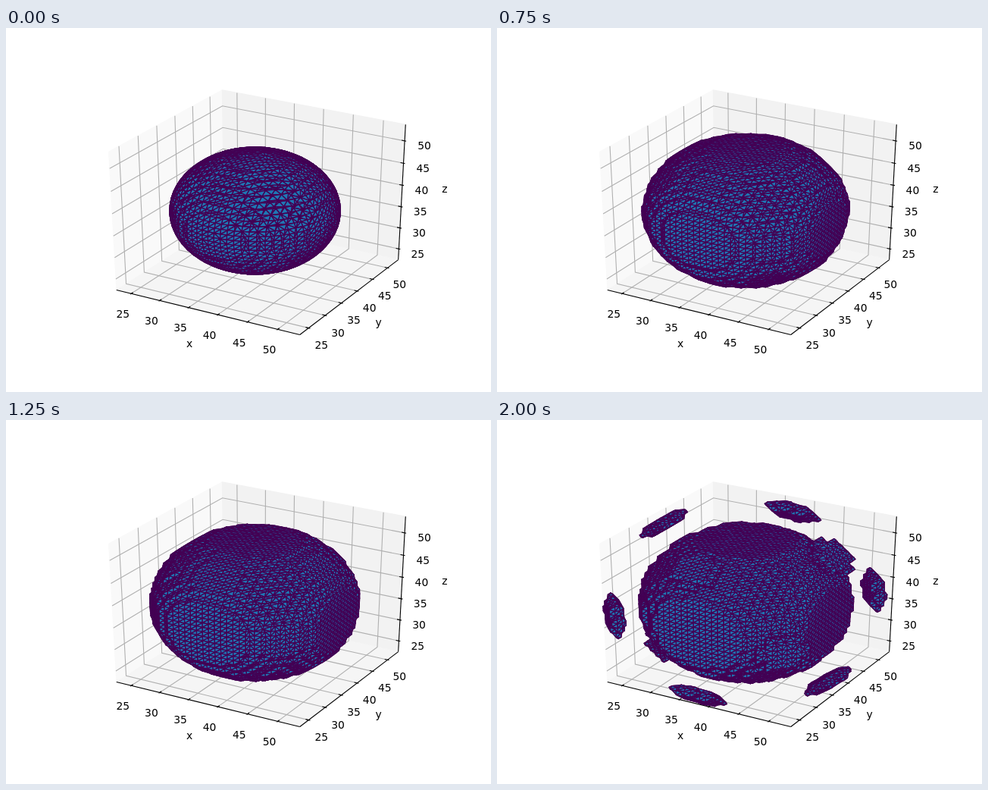
An HTML page with a canvas for the animation above (2.25 s loop, 640 by 480 pixels).

```html
<!DOCTYPE html>
<html lang="en">
<head>
<meta charset="utf-8">
<title>Growing isosurface</title>
<style>
  html, body { margin: 0; width: 100%; height: 100%; overflow: hidden; background: #fff; }
  svg, canvas { position: absolute; left: 0; top: 0; width: 640px; height: 480px; }
  text { font: 13.89px "DejaVu Sans", sans-serif; text-anchor: middle; fill: #000; }
</style>
</head>
<body>
<svg id="axes" viewBox="0 0 640 480"></svg>
<canvas id="mesh" width="640" height="480"></canvas>
<script>
const STEP = 250, LOOP = 2250;
const MID = 38, SPAN = 30;              // axis limits 23 to 53
const CENTER = 37.5;                    // middle of the volume
const LOW = 20, SIZE = 37;              // sampled voxels
const RADIUS = [12.6, 14.75, 15.1, 15.2, 15.3, 15.4, 15.5, 15.6, 15.65];
const SMOOTH = [1, 0.5, 0.12, 0.5, 0.6, 0.3, 0.12, 0.08, 0.08];

// Perspective view: elevation 30, azimuth -60, distance 10; unit-cube coordinates.
const C = Math.sqrt(3) / 2;
function project([x, y, z]) {
  const dist = 10 - (C * 0.5 * x - C * C * y + 0.5 * z);
  return [
    334.7 + 2681 * (C * x + 0.5 * y) / dist,
    237.4 - 1997.8 * (-0.25 * x + 0.5 * C * y + C * z) / dist,
    dist
  ];
}
const unit = v => (v - MID) / SPAN;

function drawAxes() {
  const H = 0.5 + 1 / 48, L = H + 0.0738;
  const IN = 1 / 60, OUT = 1 / 120;
  const out = [];
  const pts = list => list.map(p => project(p).slice(0, 2).map(n => n.toFixed(2)).join()).join(" ");
  const pane = (fill, ...p) => out.push(`<polygon points="${pts(p)}" fill="${fill}" stroke="${fill}"/>`);
  const line = (color, ...p) =>
    out.push(`<polyline points="${pts(p)}" fill="none" stroke="${color}" stroke-width="1.11"/>`);
  const text = (s, x, y) => out.push(`<text x="${x.toFixed(2)}" y="${y.toFixed(2)}">${s}</text>`);
  const tickText = (s, p, drop) => { const [x, y] = project(p); text(s, x - 0.7, y + drop); };

  pane("#f9f9f9", [-H, -H, -H], [-H, H, -H], [-H, H, H], [-H, -H, H]);
  pane("#f2f2f2", [-H, H, -H], [H, H, -H], [H, H, H], [-H, H, H]);
  pane("#f5f5f5", [-H, -H, -H], [H, -H, -H], [H, H, -H], [-H, H, -H]);

  const ticks = [25, 30, 35, 40, 45, 50];
  for (const v of ticks) {
    const s = unit(v);
    line("#b0b0b0", [s, -H, -H], [s, H, -H], [s, H, H]);
    line("#b0b0b0", [H, s, -H], [-H, s, -H], [-H, s, H]);
    line("#b0b0b0", [-H, -H, s], [-H, H, s], [H, H, s]);
  }
  line("#000", [-H, -H, -H], [H, -H, -H]);
  line("#000", [H, -H, -H], [H, H, -H]);
  line("#000", [H, H, -H], [H, H, H]);
  for (const v of ticks) {
    const s = unit(v);
    line("#000", [s, -H + IN, -H], [s, -H - OUT, -H]);
    line("#000", [H - IN, s, -H], [H + OUT, s, -H]);
    line("#000", [H - IN, H, s], [H + OUT, H, s]);
    tickText(v, [s, -L, -L], 12);
    tickText(v, [L, s, -L], 11);
    tickText(v, [L, L, s], 14);
  }
  text("x", 242, 421);
  text("y", 491.5, 393);
  text("z", 579, 217);
  document.getElementById("axes").innerHTML = out.join("");
}

// Flat lens-shaped islands lie in the twelve edge directions.
function lens(x, y, z) {
  const [a, b, c] = [x, y, z].map(Math.abs).sort((p, q) => q - p);
  const n = (a + b - 28) / Math.SQRT2;
  const rho2 = (a - b) * (a - b) / 2 + c * c;
  return 1 - Math.sqrt(rho2 / 18.5 + n * n);
}

// Positive inside: a ball, slightly flattened at its six poles.
function field(x, y, z, step) {
  const r = Math.hypot(x, y, z) || 1;
  const k = (x ** 4 + y ** 4 + z ** 4) / r ** 4;
  const flat = step ? 0.2 * Math.max(0, k - 0.6) : 0;
  const ball = RADIUS[step] * (1 - flat) - r;
  return step === 8 ? Math.max(ball, lens(x, y, z)) : ball;
}

// Cube corners are numbered by bits: 1 = x, 2 = y, 4 = z.
const FACES = [];
for (let a = 0; a < 3; a++) {
  const b = 1 << (a + 1) % 3, c = 1 << (a + 2) % 3;
  for (const d of [0, 1 << a]) FACES.push([d, d | b, d | b | c, d | c]);
}
const edgeKey = (i, j) => Math.min(i, j) * 8 + Math.max(i, j);

// Closed loops of crossed edges on one cube.
function cubeLoops(val) {
  const links = new Map();
  const link = (p, q) => {
    if (!links.has(p)) links.set(p, []);
    links.get(p).push(q);
  };
  for (const f of FACES) {
    const inside = i => val[f[i & 3]] > 0;
    for (let i = 0; i < 4; i++) {
      if (!inside(i) || inside(i + 3)) continue;
      let j = i;
      while (inside(j + 1)) j++;
      const p = edgeKey(f[(i + 3) & 3], f[i]);
      const q = edgeKey(f[j & 3], f[(j + 1) & 3]);
      link(p, q);
      link(q, p);
    }
  }
  const loops = [], seen = new Set();
  for (const start of links.keys()) {
    if (seen.has(start)) continue;
    const loop = [];
    let at = start;
    while (at !== undefined) {
      seen.add(at);
      loop.push(at);
      at = links.get(at).find(n => !seen.has(n));
    }
    loops.push(loop);
  }
  return loops;
}

function triangles(step) {
  const index = (x, y, z) => (z * SIZE + y) * SIZE + x;
  const grid = new Float32Array(SIZE ** 3);
  const local = i => LOW + i - CENTER;
  for (let z = 0; z < SIZE; z++)
    for (let y = 0; y < SIZE; y++)
      for (let x = 0; x < SIZE; x++)
        grid[index(x, y, z)] = field(local(x), local(y), local(z), step);

  const list = [], val = new Array(8);
  const crossing = (key, x, y, z) => {
    const i = key >> 3, j = key & 7;
    const t = 0.5 + (val[i] / (val[i] - val[j]) - 0.5) * SMOOTH[step];
    const place = (o, bit) => {
      const a = i & bit ? 1 : 0, b = j & bit ? 1 : 0;
      return unit(LOW + o + a + (b - a) * t);
    };
    return project([place(x, 1), place(y, 2), place(z, 4)]);
  };
  for (let z = 0; z < SIZE - 1; z++)
    for (let y = 0; y < SIZE - 1; y++)
      for (let x = 0; x < SIZE - 1; x++) {
        let count = 0;
        for (let i = 0; i < 8; i++) {
          val[i] = grid[index(x + (i & 1), y + (i >> 1 & 1), z + (i >> 2))];
          if (val[i] > 0) count++;
        }
        if (count === 0 || count === 8) continue;
        for (const loop of cubeLoops(val)) {
          const p = loop.map(key => crossing(key, x, y, z));
          for (let i = 2; i < p.length; i++) list.push([p[0], p[i - 1], p[i]]);
        }
      }
  const depth = t => t[0][2] + t[1][2] + t[2][2];
  return list.sort((a, b) => depth(b) - depth(a));
}

const ctx = document.getElementById("mesh").getContext("2d");
const meshes = RADIUS.map((_, step) => triangles(step));
let shown = -1;

function drawMesh(step) {
  ctx.clearRect(0, 0, 640, 480);
  ctx.fillStyle = "#1f77b4";
  ctx.strokeStyle = "#440154";
  ctx.lineWidth = 1.39;
  ctx.lineJoin = "round";
  for (const [a, b, c] of meshes[step]) {
    ctx.beginPath();
    ctx.moveTo(a[0], a[1]);
    ctx.lineTo(b[0], b[1]);
    ctx.lineTo(c[0], c[1]);
    ctx.closePath();
    ctx.fill();
    ctx.stroke();
  }
}

function render(time) {
  const step = Math.floor((time % LOOP) / STEP);
  if (step === shown) return;
  shown = step;
  drawMesh(step);
}

drawAxes();
render(0);
const begin = performance.now();
function tick() {
  render(performance.now() - begin);
  requestAnimationFrame(tick);
}
requestAnimationFrame(tick);
</script>
</body>
</html>
```
